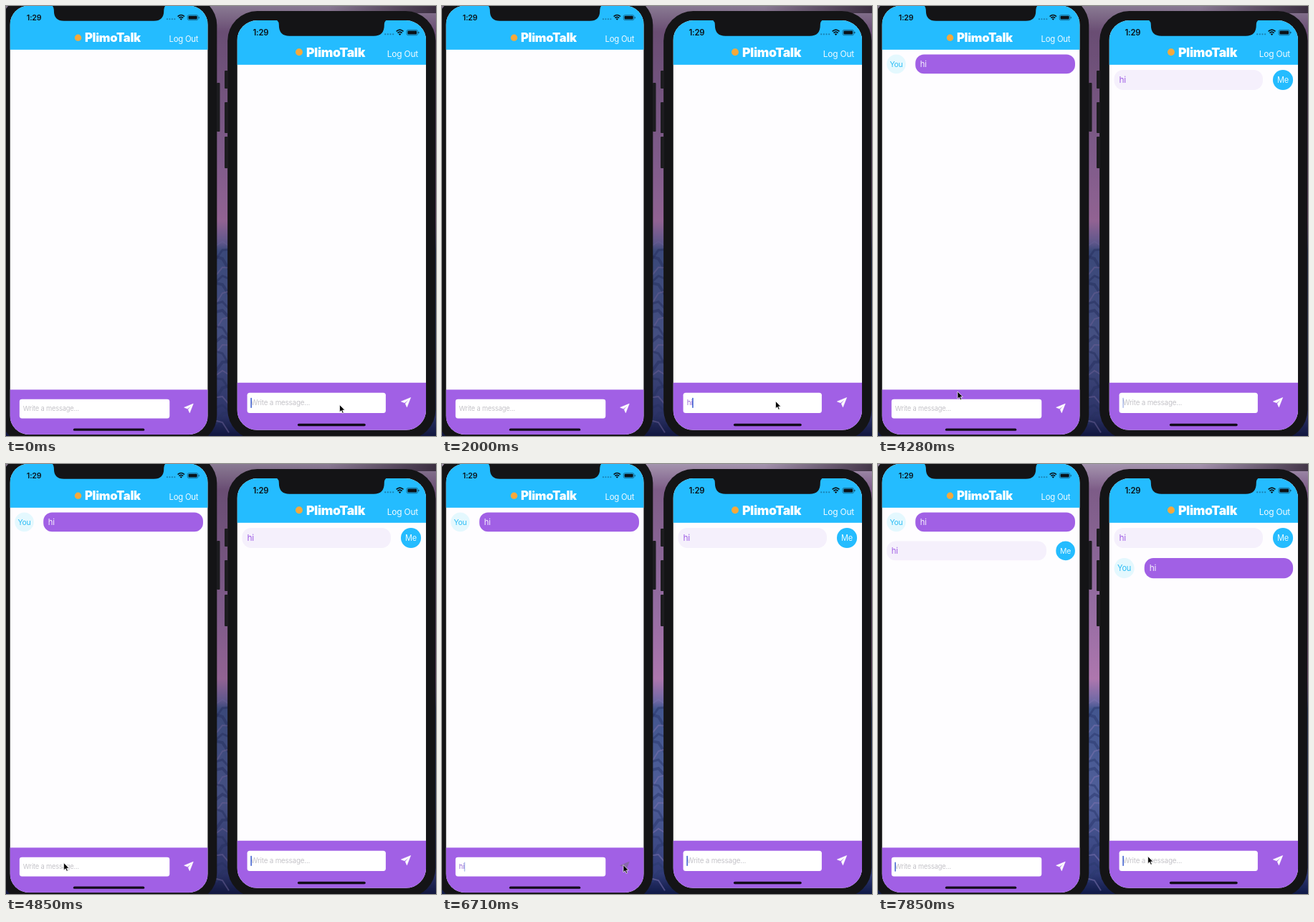
An HTML page for the animation above (8000 ms loop, 600 px wide and 599 px high).

```html
<!DOCTYPE html>
<html lang="en">
<head>
<meta charset="utf-8">
<title>Two phone chat</title>
<style>
  html, body { margin: 0; width: 100%; height: 100%; overflow: hidden; background: #141416; }
  svg { display: block; width: 100vw; height: 100vh; }
  text { font-family: Inter, Roboto, sans-serif; letter-spacing: -.02em; white-space: pre; }
</style>
</head>
<body>
<svg id="stage" viewBox="0 0 600 599" preserveAspectRatio="none">
  <defs>
    <linearGradient id="sky" x2="0" y2="1">
      <stop offset="0" stop-color="#ab9ab4"/>
      <stop offset=".06" stop-color="#82608c"/>
      <stop offset=".35" stop-color="#9d72a9"/>
      <stop offset=".5" stop-color="#b57cb4"/>
      <stop offset=".55" stop-color="#766dab"/>
      <stop offset=".57" stop-color="#465a94"/>
      <stop offset=".78" stop-color="#53639f"/>
      <stop offset=".95" stop-color="#343f7d"/>
      <stop offset="1" stop-color="#101a48"/>
    </linearGradient>
    <linearGradient id="dusk">
      <stop offset=".75" stop-color="#3c2f40" stop-opacity="0"/>
      <stop offset="1" stop-color="#3c2f40" stop-opacity=".9"/>
    </linearGradient>
  </defs>
  <rect width="600" height="599" fill="url(#sky)"/>
  <rect width="600" height="10" fill="url(#dusk)"/>
  <g id="ridges"/>
  <rect id="shade" width="600" height="599" fill="#140a1c"/>
  <g id="phones"/>
  <circle id="ring" r="15" fill="none" stroke="#111" stroke-width="1.3"/>
  <path id="cursor" d="M0 0V10.2L2.4 8.1L4 11.8L5.7 11L4.1 7.5H7.3Z" fill="#000" stroke="#fff" stroke-width=".7"/>
</svg>
<script>
const $ = id => document.getElementById(id);
const BLUE = '#24bcff', PURPLE = '#a160e5', PALE = '#f5f0fc', ICE = '#e4f8fe';

function add(parent, tag, attrs, text) {
  const el = document.createElementNS('http://www.w3.org/2000/svg', tag);
  for (const k in attrs) el.setAttribute(k, attrs[k]);
  if (text) el.textContent = text;
  parent.append(el);
  return el;
}
const box = (p, x, y, width, height, rx, fill) => add(p, 'rect', { x, y, width, height, rx, fill });
const label = (p, str, x, y, size, fill, more) =>
  add(p, 'text', { x, y, 'font-size': size, fill, ...more }, str);
const show = (el, on) => el.setAttribute('opacity', +on);

// Mountain slopes between the phones
for (let i = 0; i < 22; i++) {
  const y = 334 + i * 12, dy = 9 * Math.sin(i * 2.3);
  add($('ridges'), 'path', {
    d: `M293 ${y + dy}L302 ${y - 6}L311 ${y - dy}`, fill: 'none',
    stroke: i % 3 ? '#2e3c73' : '#8077b5', 'stroke-width': 2 + i % 3, opacity: .55
  });
}

function bubble(p, w, y, mine) {
  const g = add(p, 'g', {});
  box(g, mine ? 10 : 70, y, w - 80, 40, 18, mine ? PALE : PURPLE);
  label(g, 'hi', mine ? 20 : 80, y + 26, 17, mine ? PURPLE : PALE);
  const cx = mine ? w - 30 : 30;
  add(g, 'circle', { cx, cy: y + 20, r: 20, fill: mine ? BLUE : ICE });
  label(g, mine ? 'Me' : 'You', cx, y + 26, 15.7, mine ? '#e9faff' : '#2cbdf5', { 'text-anchor': 'middle' });
  return g;
}

// Sizes are in device points, scaled by s
function phone({ id, x, y, s, w, h, head, notch, depth, margin, timeX, base, order }) {
  const root = add($('phones'), 'g', { transform: `translate(${x} ${y}) scale(${s})` });
  box(root, -19, -18.5, w + 38, h + 37, 59, '#141416');
  const clip = add(root, 'clipPath', { id });
  box(clip, 0, 0, w, h, 40);
  const g = add(root, 'g', { 'clip-path': `url(#${id})` });
  box(g, 0, 0, w, h, 0, '#fefdff');
  box(g, 0, 0, w, head, 0, BLUE);

  const a = (w - notch) / 2, b = w - a;
  add(g, 'path', {
    d: `M${a - 8} -2Q${a} 0 ${a} 9V${depth - 21}Q${a} ${depth} ${a + 21} ${depth}H${b - 21}` +
       `Q${b} ${depth} ${b} ${depth - 21}V9Q${b} 0 ${b + 8} -2Z`, fill: '#141416'
  });

  // Status bar
  label(g, '1:29', timeX, base, 16, '#0a1218', { 'font-weight': 600 });
  const r = w - margin, cy = base - 6;
  for (let i = 0; i < 4; i++) add(g, 'circle', { cx: r - 65 + i * 5.2, cy: base - 2.6, r: 1.6, fill: '#1a7eae' });
  add(g, 'path', {
    d: `M${r - 43} ${cy - 2}q7 -6.5 14 0M${r - 40.4} ${cy + 1}q4.4 -4 8.8 0`,
    fill: 'none', stroke: '#0a1218', 'stroke-width': 2.4
  });
  add(g, 'path', { d: `M${r - 38.6} ${cy + 3}q2.6 -2 5.2 0l-2.6 2.8z`, fill: '#0a1218' });
  add(g, 'rect', {
    x: r - 22.5, y: cy - 5, width: 22, height: 10.5, rx: 3, fill: 'none', stroke: '#0d4f70', 'stroke-width': 1
  });
  box(g, r - 20.6, cy - 3.2, 18.2, 7, 1.5, '#0a1218');
  box(g, r + .6, cy - 1.6, 1.5, 4, .7, '#0d4f70');

  // Header
  add(g, 'circle', { cx: w / 2 - 64.5, cy: head - 25, r: 7, fill: '#f6a93b' });
  label(g, 'PlimoTalk', w / 2 - 50.3, head - 16, 25, '#fff', { 'font-weight': 900 });
  label(g, 'Log Out', r, head - 16, 17, '#f2fbff', { 'text-anchor': 'end' });

  const msgs = order.map((mine, i) => bubble(g, w, head + 10 + i * 60, mine));

  // Message bar
  box(g, 0, h - 94, w, 94, 0, PURPLE);
  box(g, 20, h - 74, w - 100, 40, 5, '#fff');
  const hint = label(g, 'Write a message...', 27.5, h - 49, 14, '#c4c3c8');
  const typed = label(g, '', 27.5, h - 49, 14, '#9767d6');
  const caret = box(g, 27, h - 64, 2.2, 20, 1, '#3d5fd0');
  const send = add(g, 'path', {
    d: 'M9.5 -9.5L-9.5 -1.8L-2.6 1L6 -6L-1 2.6L2 9.5Z', transform: `translate(${w - 40} ${h - 55})`,
    fill: '#fff', stroke: '#fff', 'stroke-width': .8, 'stroke-linejoin': 'round'
  });
  box(g, w * .32, h - 13, w * .36, 5, 2.5, '#120c1a');

  return {
    root, send,
    draw(text, blink, count) {
      typed.textContent = text;
      show(hint, !text);
      caret.setAttribute('x', 26.8 + (text ? typed.getComputedTextLength() : 0));
      caret.setAttribute('opacity', blink);
      msgs.forEach((m, i) => show(m, i < count));
    }
  };
}

const left = phone({
  id: 'l', x: 5.5, y: -.5, s: .667, w: 414, h: 896, head: 92,
  notch: 230, depth: 32, margin: 20, timeX: 35, base: 30.7, order: [false, true]
});
const right = phone({
  id: 'r', x: 322.5, y: 20, s: .703, w: 375, h: 812, head: 88,
  notch: 209, depth: 31, margin: 16, timeX: 31.3, base: 30, order: [true, false]
});

// Side buttons
for (const [x, y, h] of [[294, 107, 68], [305, 90, 25], [305, 134, 43], [305, 182, 44]])
  box($('phones'), x, y, 4.5, h, 1, '#1c1c1f');

// Pointer stops: tick, x, y (seven ticks per second)
const PATH = [
  [0, 465.5, 555.5], [2, 465.5, 555.5], [7, 465.5, 550.5], [15, 465.5, 550.5], [21, 553, 552.5],
  [24, 553, 552.5], [30, 111, 537], [34, 75, 559], [41, 75, 559], [46, 253, 558.5],
  [49, 253, 558.5], [55, 386.5, 545.5], [56, 386.5, 545.5]
];
function pointer(t) {
  const i = Math.max(1, PATH.findIndex(p => p[0] >= t));
  const [t0, x0, y0] = PATH[i - 1], [t1, x1, y1] = PATH[i];
  const u = (t - t0) / (t1 - t0), e = u * u * (3 - 2 * u);
  return [x0 + (x1 - x0) * e, y0 + (y1 - y0) * e];
}

// Tick, typed text, caret phase start
const TYPE_R = [[0, '', 0], [9, 'h', 9], [12, 'hi', 9], [24, '', 21]];
const TYPE_L = [[0, '', -1], [34, '', 33], [40, 'h', 33], [42, 'hi', 45], [49, '', 49]];
const BLINK = [1, 1, .4, 0, 0, 1, 1];
const at = (table, t) => table.filter(row => row[0] <= t).pop();
const blink = (t, from) => from < 0 ? 0 : BLINK[(t - from + 7) % 7];

function frame() {
  const ms = performance.now() % 8000;
  const t = Math.min(55, Math.floor((ms + 6) * 7 / 1000));
  const [, textR, fromR] = at(TYPE_R, t), [, textL, fromL] = at(TYPE_L, t);
  right.draw(textR, blink(t, fromR), (t >= 23) + (t >= 50));
  left.draw(textL, blink(t, fromL), (t >= 25) + (t >= 48));
  const press = t === 47 ? '#8669a6' : '#fff';
  left.send.setAttribute('fill', press);
  left.send.setAttribute('stroke', press);
  $('shade').setAttribute('opacity', t < 34 ? .22 : .04);
  const [x, y] = pointer(t);
  $('cursor').setAttribute('transform', `translate(${x} ${y})`);
  $('ring').setAttribute('transform', `translate(${x} ${y})`);
  show($('ring'), t >= 55);
  requestAnimationFrame(frame);
}
frame();
</script>
</body>
</html>
```
